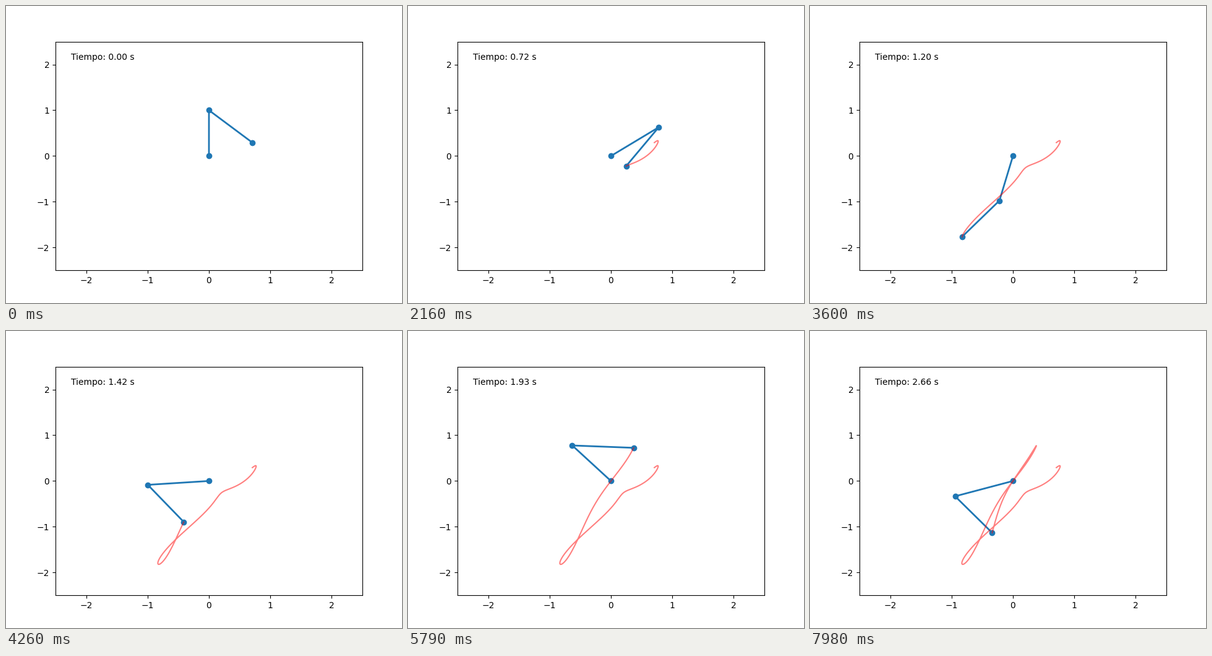
Recreate the animation shown at these times as a matplotlib script. Size 640 by 480 pixels, loop 8 s.

```python
import numpy as np
import matplotlib.pyplot as plt
from matplotlib.animation import FuncAnimation

G = 9.81
M1, M2 = 2.0, 1.0
L1, L2 = 1.0, 1.0
DT = 0.01
FRAMES = 267
SUBSTEPS = 10


def derivs(state):
    """Equations of motion of a double pendulum, angles from straight down."""
    a, b, wa, wb = state
    s, c = np.sin(a - b), np.cos(a - b)
    den = M1 + M2 * s * s
    acc_a = (-M2 * s * (L1 * wa**2 * c + L2 * wb**2)
             - (M1 + M2) * G * np.sin(a) + M2 * G * np.sin(b) * c) / (L1 * den)
    acc_b = (s * ((M1 + M2) * L1 * wa**2 + M2 * L2 * wb**2 * c)
             + (M1 + M2) * G * (np.sin(a) * c - np.sin(b))) / (L2 * den)
    return np.array([wa, wb, acc_a, acc_b])


def rk4(state, h):
    k1 = derivs(state)
    k2 = derivs(state + h / 2 * k1)
    k3 = derivs(state + h / 2 * k2)
    k4 = derivs(state + h * k3)
    return state + h / 6 * (k1 + 2 * k2 + 2 * k3 + k4)


def simulate():
    state = np.array([np.pi, np.pi / 4, 0.0, 1.0])
    states = [state]
    for _ in range(FRAMES - 1):
        for _ in range(SUBSTEPS):
            state = rk4(state, DT / SUBSTEPS)
        states.append(state)
    return np.array(states)


theta1, theta2 = simulate()[:, :2].T
x1, y1 = L1 * np.sin(theta1), -L1 * np.cos(theta1)
x2, y2 = x1 + L2 * np.sin(theta2), y1 - L2 * np.cos(theta2)

fig, ax = plt.subplots(figsize=(6.4, 4.8), dpi=100)
ax.set_xlim(-2.5, 2.5)
ax.set_ylim(-2.5, 2.5)
rods, = ax.plot([], [], "o-", lw=2)
trail, = ax.plot([], [], "r-", alpha=0.5)
clock = ax.text(0.05, 0.92, "", transform=ax.transAxes)


def update(i):
    rods.set_data([0, x1[i], x2[i]], [0, y1[i], y2[i]])
    trail.set_data(x2[:i + 1], y2[:i + 1])
    clock.set_text(f"Tiempo: {i * DT:.2f} s")
    return rods, trail, clock


anim = FuncAnimation(fig, update, frames=FRAMES, interval=30,
                     init_func=lambda: update(0), repeat=True, repeat_delay=0)
plt.show()
```
